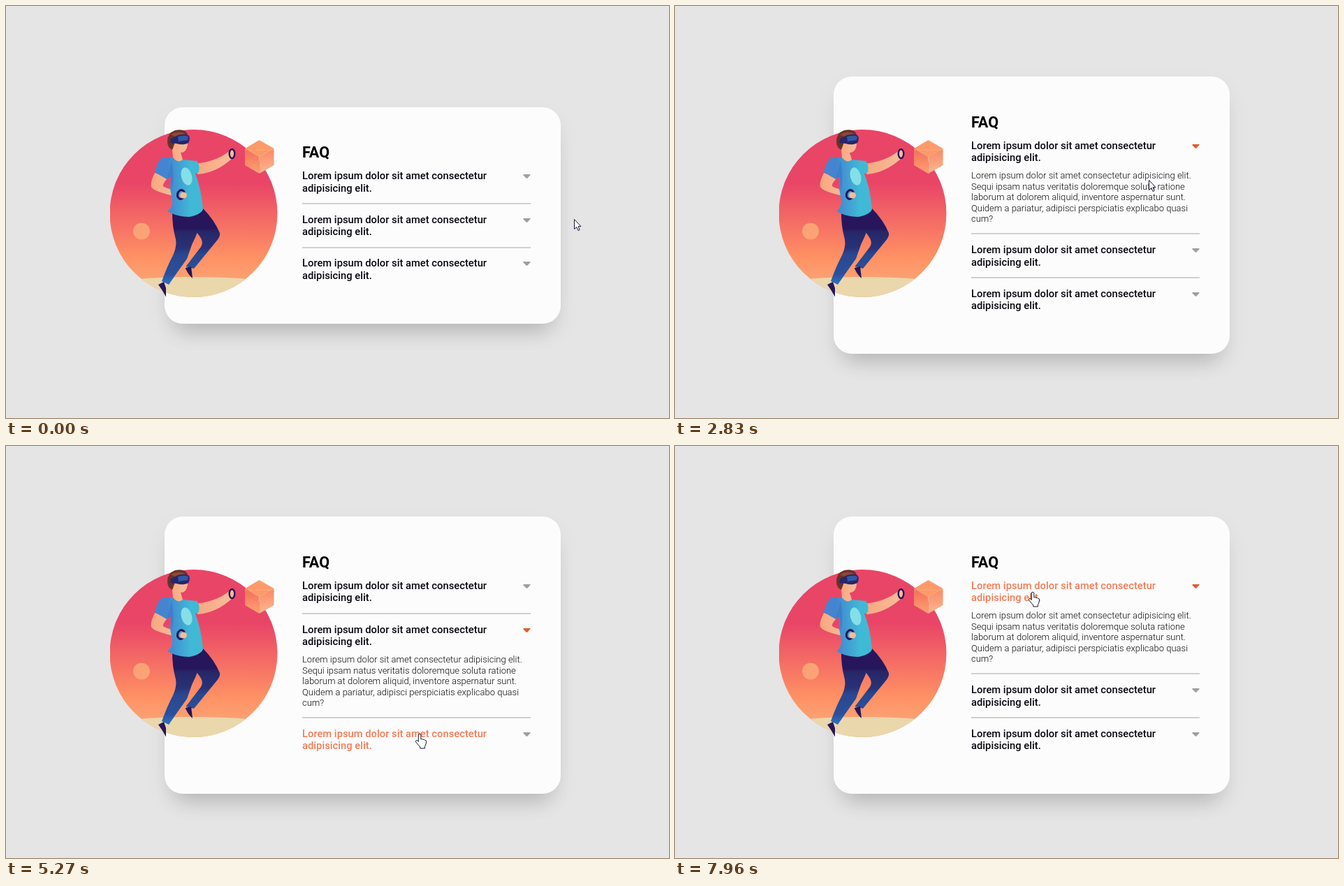
These frames come from a looping animation (949x590 px, 8 s). An HTML page:

```html
<!DOCTYPE html>
<html lang="en">
<head>
<meta charset="utf-8">
<title>FAQ accordion</title>
<style>
html, body { margin: 0; width: 100%; height: 100%; overflow: hidden; background: #e5e5e5; }
#card {
  position: absolute; left: 227px; width: 567px; border-radius: 26px; background: #fcfcfc;
  box-shadow: 0 26px 30px -18px rgba(0,0,0,.17), 0 14px 34px -4px rgba(0,0,0,.08);
}
#stage { position: absolute; left: 0; top: 0; }
text { font-family: Roboto, sans-serif; }
#head { font-size: 21.6px; font-weight: 700; }
.q { font-size: 14.75px; font-weight: 500; }
.a text { font-size: 13px; font-weight: 300; fill: #0c0c0c; }
#cursor path { fill: #fff; stroke: #1b1b30; stroke-linejoin: round; }
</style>
</head>
<body>
<div id="card"></div>
<svg id="stage" width="949" height="590">
  <defs>
    <linearGradient id="sky" x2="0" y2="1">
      <stop offset=".32" stop-color="#e94567"/><stop offset=".76" stop-color="#ff9163"/>
      <stop offset=".9" stop-color="#fba273"/>
    </linearGradient>
    <linearGradient id="shirt"><stop offset=".25" stop-color="#4484d0"/><stop offset=".75" stop-color="#40b9d6"/></linearGradient>
    <linearGradient id="leg" gradientUnits="userSpaceOnUse" x1="0" x2="0" y1="300" y2="400">
      <stop offset=".18" stop-color="#27165c"/><stop offset=".24" stop-color="#272768"/>
      <stop offset=".46" stop-color="#283277"/><stop offset=".56" stop-color="#2a4790"/>
      <stop offset=".84" stop-color="#2a509c"/><stop offset=".95" stop-color="#2d6cba"/>
    </linearGradient>
    <linearGradient id="skin"><stop offset="0" stop-color="#f9a77f"/><stop offset="1" stop-color="#f8bd9c"/></linearGradient>
    <linearGradient id="left" x2="0" y2="1"><stop offset=".2" stop-color="#f3785f"/><stop offset=".9" stop-color="#ff9d70"/></linearGradient>
    <linearGradient id="right" x2="0" y2="1"><stop offset=".1" stop-color="#f88d69"/><stop offset=".8" stop-color="#fcae87"/></linearGradient>
    <clipPath id="disc"><circle cx="268.500" cy="297" r="120"/></clipPath>
    <clipPath id="edge"><path d="M149 170H400V430H149z"/></clipPath>
  </defs>

  <g clip-path="url(#edge)">
    <circle cx="268.500" cy="297" r="120" fill="url(#sky)"/>
    <ellipse cx="268" cy="423" rx="200" ry="35" fill="#ead7ac" clip-path="url(#disc)"/>
    <circle cx="194" cy="322.500" r="12" fill="#fba376"/>
  </g>
  <g id="cube">
    <path d="M362.500 192L383.500 204 362.500 216 342 204z" fill="#fd9a69"/>
    <path d="M342 204L362.500 216V240L342 228z" fill="url(#left)"/>
    <path d="M383.500 204L362.500 216V240L383.500 228z" fill="url(#right)"/>
    <path d="M342 206H383.500" stroke="#fdb58f" opacity=".6"/>
  </g>
  <g id="player">
    <path d="M260 298L282 290Q298 306 306 325 307 330 301 337L269 376 257.500 373 279 345Q284 338 276 328L268 318z" fill="url(#leg)"/>
    <path d="M257 375L265 373 267 390Q261 385 257 376z" fill="#27165c"/>
    <path d="M238 296Q262 304 281 298 278 318 266 342L259 362Q252 372 244 383L233 399 223 394Q231 372 239 357 246 342 242 330 238 315 238 296z" fill="url(#leg)"/>
    <path d="M218 399L226 395 229 404V416.500Q224 407 218 399z" fill="#27165c"/>
    <path d="M272 226Q302 222 318 209 323 204 327 209L325 217Q302 239 274 241z" fill="url(#skin)"/>
    <path d="M213 239Q206 253 208 259 211 266 245 273L247 265Q228 261 225 258 224 254 232 246z" fill="url(#skin)"/>
    <path d="M222 218L239 216Q246 223 253 220L273 222Q278 228 276 238L271 240Q280 264 282 291 279 299 262 302 245 302 231 294 238 290 238 278L235 262 236 244 230 248 213 238Q216 225 222 218z" fill="url(#shirt)"/>
    <path d="M237 222Q242 245 237 264L236 244 230 248z" fill="#3a76c4" opacity=".6"/>
    <ellipse cx="258.500" cy="244" rx="7.500" ry="13" fill="#86dfe7" transform="rotate(-15 258.500 244)"/>
    <path d="M236 194L260 195Q260 210 250 210L253 220Q246 226 239 217L238 206z" fill="url(#skin)"/>
    <path d="M238 206Q231 203 231 194 231 182 242 178 257 175 260 184L243 188 241 198z" fill="#6c3129"/>
    <path d="M236 184Q246 178 257 183L242 187z" fill="#8c4937"/>
    <path d="M236 190L246 185Q258 182 262 186 264 191 261 196 254 200 244 197L235 196z" fill="#27256b"/>
    <path d="M246 187Q256 184 261 187L260 192 247 194z" fill="#3159a4"/>
    <ellipse cx="250.500" cy="270" rx="5" ry="6.500" fill="none" stroke="#27165c" stroke-width="3" transform="rotate(15 250.500 270)"/>
    <ellipse cx="254" cy="271" rx="5" ry="4.500" fill="#f8b995"/>
    <ellipse cx="323.500" cy="211.500" rx="3.800" ry="6.500" fill="none" stroke="#27165c" stroke-width="2.400"/>
  </g>

  <text id="head" x="424">FAQ</text>
  <g id="list"></g>
  <circle id="spot" r="10" fill="#fff82e" opacity=".72"/>
  <g id="cursor">
    <path id="arrow" d="M.5 .5V14.500L3.800 11.600 6 16.500 8.200 15.500 6 10.700H10z"/>
    <path id="hand" d="M-1.700 2a1.800 1.800 0 0 1 3.600 0V8q1.600-1.200 3 .5 1.700-1 2.700 .8 2-.3 2 1.800 0 4-2.200 7.400v2.500H.8v-2L-5.300 12q-.8-2.300 1.200-2.600 1.200 0 2.400 2z"/>
    <path id="beam" d="M-3-7H-1L0-6 1-7H3M0-6V6M-3 7H-1L0 6 1 7H3" style="fill:none"/>
  </g>
</svg>
<script>
const LOOP = 8000, ANSWER = 86.7, ROW = 62.5, FADE = 200;
const question = ["Lorem ipsum dolor sit amet consectetur", "adipisicing elit."];
const answer = [
  "Lorem ipsum dolor sit amet consectetur adipisicing elit.",
  "Sequi ipsam natus veritatis doloremque soluta ratione",
  "laborum at dolorem aliquid, inventore aspernatur sunt.",
  "Quidem a pariatur, adipisci perspiciatis explicabo quasi",
  "cum?"
];
// [start, end] of each stay, per item
const opened = [[[2010, 3800], [7430, 9e3]], [[3800, 5560]], [[5560, 7430]]];
const hovered = [
  [[1290, 2020], [7000, 9e3]],
  [[3330, 3850], [6730, 6850]],
  [[5030, 5600], [6650, 6690]]
];
const clicks = [[1890, 2070], [3650, 3850], [5450, 5610], [7420, 7530]];
const beams = [[3850, 4780], [5600, 6650]];
// [start, end, x, y]: the pointer arrives at x, y at the end
const moves = [
  [-1, 0, 813, 305], [780, 990, 781, 287], [1190, 1540, 680, 249], [2830, 2831, 678, 249],
  [2840, 3580, 620, 352], [4640, 4650, 619, 352], [4660, 5270, 592, 412],
  [6590, 6870, 518, 249], [6930, 7280, 512, 209]
];

const $ = id => document.getElementById(id);
const clamp = v => Math.max(0, Math.min(1, v));
const smooth = v => v * v * (3 - 2 * v);
const within = (spans, t) => spans.some(([a, b]) => t >= a && t < b);
const level = (spans, t) => clamp(spans.reduce((sum, [a, b]) =>
  sum + Math.max(0, clamp((Math.min(t, b) - a) / FADE) - Math.max(0, t - b) / FADE), 0));
const mix = (a, b, k) => `rgb(${a.map((v, i) => Math.round(v + (b[i] - v) * k))})`;

const INK = [8, 8, 16], CORAL = [244, 123, 86], GREY = [158, 160, 157], ORANGE = [223, 95, 48];

$("list").innerHTML = opened.map((_, i) => `<g>
  ${question.map(s => `<text class="q" x="424">${s}</text>`).join("")}
  <path class="tip" d="M740.500-7.500Q740-8 741-8H750Q751-8 750.500-7L746.500-2.600Q745.500-1.800 744.500-2.600L740.300-6.800z"/>
  <svg class="a" x="424" width="330">
    ${answer.map((s, n) => `<text y="${18 + Math.round(15.6 * n)}">${s}</text>`).join("")}
  </svg>
  ${i < 2 ? '<rect x="424" width="327" height="2" fill="#d0d0d0"/>' : ""}</g>`).join("");

const items = [...$("list").children].map(g => ({
  lines: g.querySelectorAll(".q"), tip: g.querySelector(".tip"),
  body: g.querySelector(".a"), rule: g.querySelector("rect")
}));

function pointer(t) {
  let [, , x, y] = moves[0];
  for (const [a, b, px, py] of moves) {
    const u = clamp((t - a) / (b - a)), k = u * (2 - u);
    x += (px - x) * k;
    y += (py - y) * k;
  }
  return [Math.round(x), Math.round(y)];
}

function draw(t) {
  const open = opened.map(spans => smooth(level(spans, t)));
  const extra = ANSWER * open.reduce((a, b) => a + b);
  const top = 144.7 - extra / 2, edge = Math.round(top);
  $("card").style.top = edge + "px";
  $("card").style.height = Math.round(top + 310 + extra) - edge + "px";
  $("head").setAttribute("y", Math.round(top + 72.5));

  let base = top + 103.7;
  items.forEach(({ lines, tip, body, rule }, i) => {
    lines.forEach((line, n) => {
      line.setAttribute("y", Math.round(base + 17.4 * n));
      line.setAttribute("fill", mix(INK, CORAL, level(hovered[i], t)));
    });
    tip.setAttribute("transform", `translate(0 ${Math.round(base) + 1})`);
    tip.setAttribute("fill", mix(GREY, ORANGE, open[i]));
    body.setAttribute("y", Math.round(base + 24));
    body.setAttribute("height", ANSWER * open[i]);
    base += ROW + ANSWER * open[i];
    if (rule) rule.setAttribute("y", Math.round(base - 28.8));
  });

  const [x, y] = pointer(t);
  const kind = hovered.some(spans => within(spans, t)) ? "hand" : within(beams, t) ? "beam" : "arrow";
  for (const id of ["arrow", "hand", "beam"]) $(id).style.display = id === kind ? "" : "none";
  $("cursor").setAttribute("transform", `translate(${x} ${y})`);
  $("spot").setAttribute("transform", `translate(${x} ${y})`);
  $("spot").style.display = within(clicks, t) ? "" : "none";
}

function tick() {
  draw(performance.now() % LOOP);
  requestAnimationFrame(tick);
}
tick();
</script>
</body>
</html>
```
